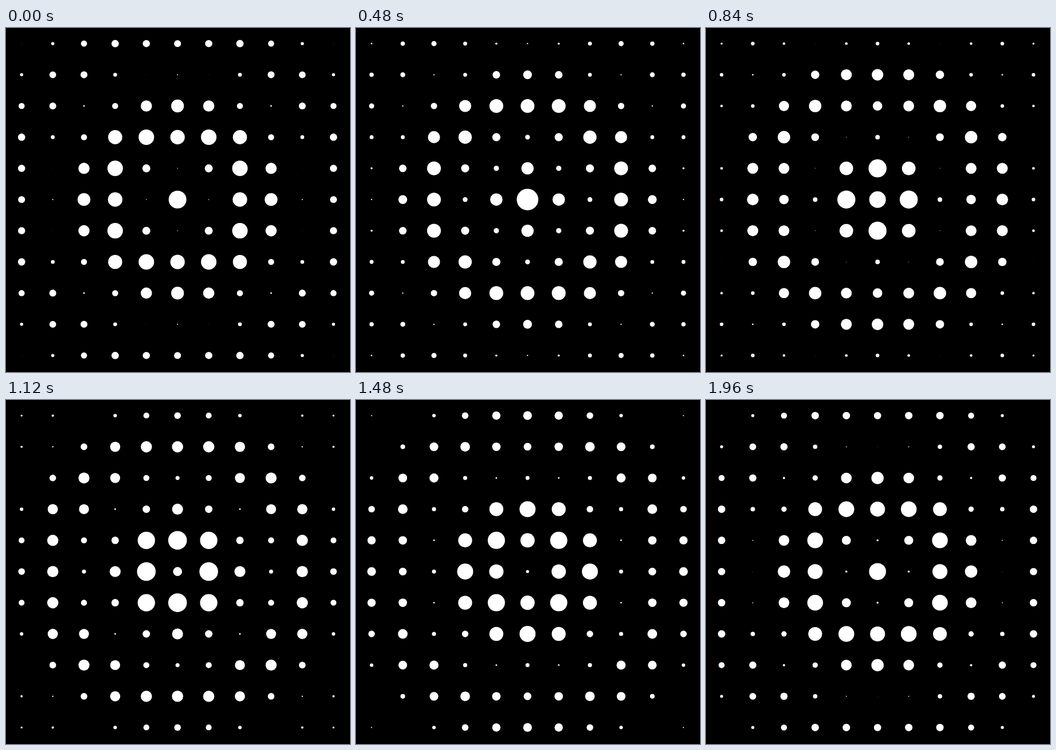
An HTML page that plays this animation: 600x600 px, repeating every 2 s.

```html
<!DOCTYPE html>
<html lang="en">
<head>
<meta charset="utf-8">
<title>Dot ripple</title>
<style>
  html, body { margin: 0; width: 100%; height: 100%; overflow: hidden; background: #000; }
  svg { display: block; width: 100%; height: 100%; }
</style>
</head>
<body>
<svg id="stage" viewBox="0 0 600 600" fill="#fff"></svg>
<script>
  const LOOP = 2000, STEP = 40;
  const HALF = 5, SPACING = 54.4, CENTER = 299.2;
  const PHASE = 0.615;
  const stage = document.getElementById('stage');
  const dots = [];

  // Largest diameter a dot reaches, falling off from the middle
  const peak = d => 36 - 2.95 * d - 0.235 * d * d + 2 * Math.exp(-3 * d);

  for (let row = -HALF; row <= HALF; row++) {
    for (let col = -HALF; col <= HALF; col++) {
      const circle = document.createElementNS('http://www.w3.org/2000/svg', 'circle');
      circle.setAttribute('cx', CENTER + col * SPACING);
      circle.setAttribute('cy', CENTER + row * SPACING);
      stage.appendChild(circle);
      const distance = Math.hypot(col, row);
      dots.push({ circle, distance, radius: peak(distance) / 2 });
    }
  }

  function draw(ms) {
    const time = Math.floor((ms % LOOP) / STEP) * STEP;
    const angle = Math.PI * time / LOOP - PHASE;
    for (const { circle, distance, radius } of dots) {
      circle.setAttribute('r', (radius * Math.abs(Math.cos(angle - distance))).toFixed(3));
    }
  }

  const start = performance.now();
  function tick() {
    draw(performance.now() - start);
    requestAnimationFrame(tick);
  }
  tick();
</script>
</body>
</html>
```
